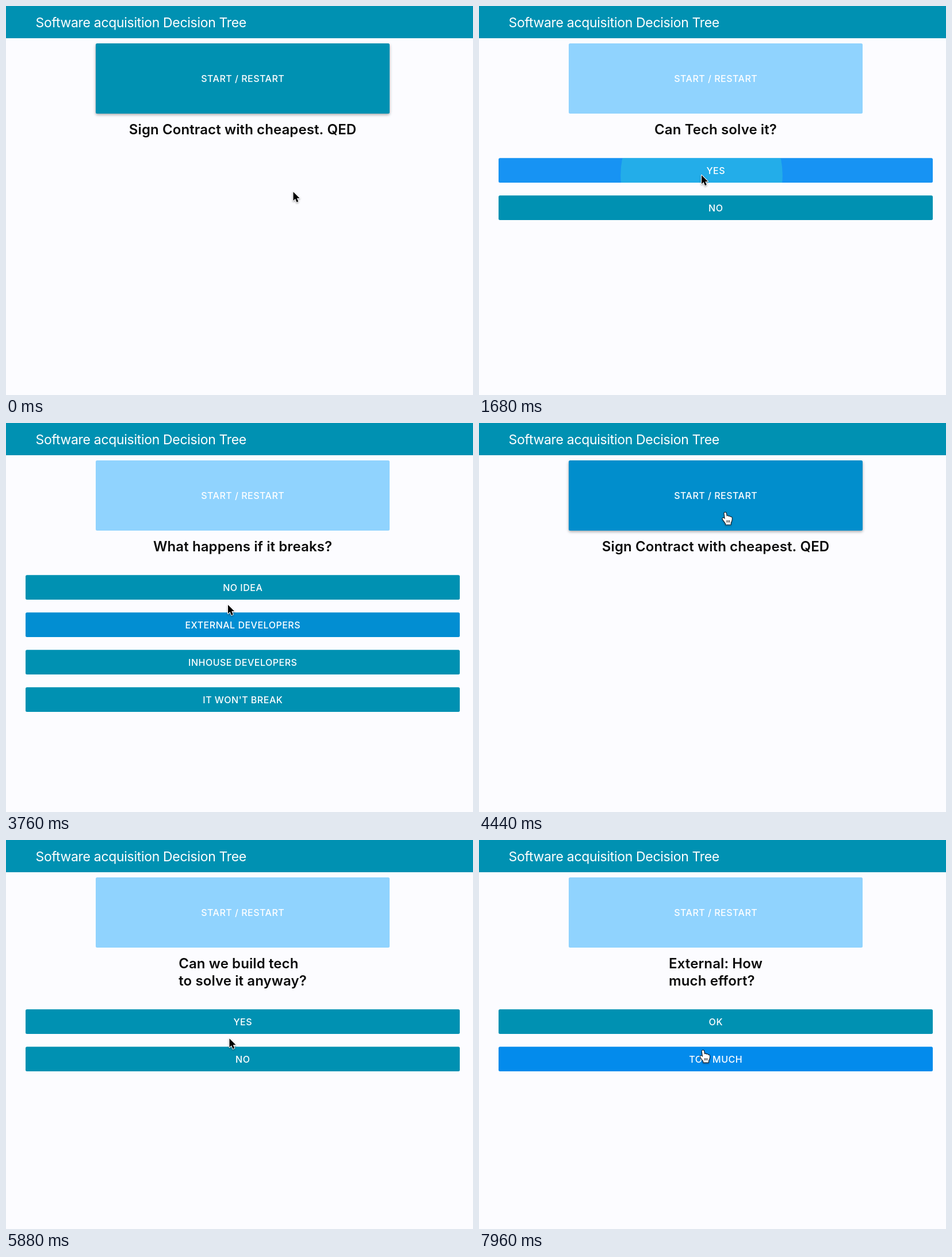
An HTML page with a canvas for the animation above (8000 ms loop, 812 by 676 pixels).

```html
<!DOCTYPE html>
<html lang="en">
<head>
<meta charset="utf-8">
<title>Decision Tree</title>
<style>
html, body { margin: 0; width: 100%; height: 100%; overflow: hidden; background: #fcfcff; }
canvas { display: block; }
</style>
</head>
<body>
<canvas id="stage" width="812" height="676"></canvas>
<script>
const ctx = document.getElementById('stage').getContext('2d');
const LOOP = 8000, STEP = 40, MID = 411.5;
const FONT = 'Inter, "Open Sans", sans-serif';
const TEAL = [0, 145, 178], HOVER = [3, 138, 242], DISABLED = [144, 211, 254];
const START = { x: 156, y: 65, w: 511, h: 122 };

const problem = { text: ['You have a problem or feature!'], options: ['OK'] };
const canSolve = { text: ['Can Tech solve it?'], options: ['YES', 'NO'] };
const available = { text: ['Is there tech available', 'that could solve', 'the problem?'], options: ['YES', 'NO'] };
const kind = { text: ['What kind of tech is it?'], options: ['NO IDEA', 'OPEN SOURCE', 'CLOSED SOURCE', 'INHOUSE', 'OTHER'] };
const breaks = { text: ['What happens if it breaks?'], options: ['NO IDEA', 'EXTERNAL DEVELOPERS', 'INHOUSE DEVELOPERS', "IT WON'T BREAK"] };
const build = { text: ['Can we build tech', 'to solve it anyway?'], options: ['YES', 'NO'] };
const developers = { text: ['Do you have developers?'], options: ['YES', 'NO'] };
const effort = { text: ['External: How', 'much effort?'], options: ['OK', 'TOO MUCH'] };
const signed = { text: ['Sign Contract with cheapest. QED'], options: [] };

// Each press: time, pressed button (-1 is START) and the screen it leads to.
const presses = [
  [600, -1, problem], [1480, 0, canSolve], [2000, 0, available],
  [2560, 0, kind], [3270, 1, breaks], [3960, 0, signed],
  [4600, -1, problem], [5110, 0, canSolve], [5400, 1, build],
  [6440, 0, developers], [7480, 1, effort]
].map(([time, button, next]) => ({ time, button, next }));
const RING_TIME = 120, SWITCH_DELAY = 140;

// Pointer path: time, x, y.
const path = [
  [0, 499.5, 323], [100, 499.5, 323], [480, 432, 150], [860, 432, 150],
  [1300, 387, 294], [1800, 387, 294], [1920, 388, 297], [2160, 388, 297],
  [2480, 394.5, 348], [2900, 394.5, 348], [3150, 388, 346], [3560, 388, 346],
  [3760, 386, 316], [3880, 388, 288], [4160, 388, 288], [4480, 430, 150],
  [4780, 430, 150], [5000, 418, 247], [5080, 405, 288], [5200, 405, 288],
  [5370, 388.5, 345], [5950, 388.5, 345], [6200, 389, 333], [7640, 389, 333],
  [7860, 389.5, 366], [8000, 389.5, 366]
];

const clamp = v => Math.max(0, Math.min(1, v));
const ease = v => v * v * (3 - 2 * v);
const mix = (a, b, k) => a.map((v, i) => v + (b[i] - v) * k);
const rgb = c => `rgb(${c.map(Math.round).join(',')})`;
const isEnd = screen => !screen.options.length;

function pointer(t) {
  const i = Math.max(1, path.findIndex(p => p[0] >= t));
  const [t0, x0, y0] = path[i - 1], [t1, x1, y1] = path[i];
  const k = ease(clamp((t - t0) / (t1 - t0)));
  return { x: x0 + (x1 - x0) * k, y: y0 + (y1 - y0) * k };
}

function screenAt(t) {
  let state = { screen: signed, last: signed, since: -1000 };
  for (const p of presses) {
    const since = p.time + SWITCH_DELAY;
    if (t >= since) state = { screen: p.next, last: state.screen, since };
  }
  return state;
}

function box(screen, i) {
  if (i < 0) return START;
  return { x: 34, y: 264.3 + 30 * (screen.text.length - 1) + 65 * i, w: 755, h: 42.8 };
}

function hovered(t) {
  const { screen } = screenAt(t), p = pointer(t);
  const hit = i => {
    const b = box(screen, i);
    return p.x >= b.x && p.x <= b.x + b.w && p.y >= b.y && p.y <= b.y + b.h;
  };
  if (isEnd(screen)) return hit(-1) ? -1 : null;
  const i = screen.options.findIndex((_, n) => hit(n));
  return i < 0 ? null : i;
}

// Share of the last 200 ms that the pointer spent on the button.
function hoverLevel(t, i) {
  let n = 0;
  for (let s = 0; s < 10; s++) if (hovered(Math.max(0, t - s * 20)) === i) n++;
  return n / 10;
}

function label(text, y) {
  ctx.font = `500 16px ${FONT}`;
  ctx.letterSpacing = '0.5px';
  ctx.textAlign = 'center';
  ctx.fillStyle = '#fff';
  ctx.fillText(text, MID + 0.25, y);
}

function ripple(b, spot, age) {
  const fade = clamp((440 - age) / 240);
  ctx.fillStyle = `rgba(255,255,255,${0.08 * fade * clamp(age / 100)})`;
  ctx.fillRect(b.x, b.y, b.w, b.h);
  ctx.fillStyle = `rgba(50,205,220,${0.45 * fade})`;
  ctx.beginPath();
  const y = Math.max(b.y, Math.min(b.y + b.h, spot.y));
  ctx.arc(spot.x, y, 400 * ease(clamp(age / 400)), 0, Math.PI * 2);
  ctx.fill();
}

function button(t, b, i, text, color, raised) {
  ctx.save();
  if (raised) {
    ctx.shadowColor = 'rgba(0,0,0,.35)';
    ctx.shadowBlur = 5;
    ctx.shadowOffsetY = 2;
  }
  ctx.fillStyle = rgb(color);
  ctx.beginPath();
  ctx.roundRect(b.x, b.y, b.w, b.h, 2.5);
  ctx.fill();
  ctx.shadowColor = 'transparent';
  ctx.clip();
  for (const p of presses) {
    const age = t - p.time - 40;
    if (p.button === i && age > 0 && age < 440) ripple(b, pointer(p.time), age);
  }
  ctx.restore();
  label(text, b.y + b.h / 2 + 6.2);
}

function heading(lines) {
  ctx.font = `600 24px ${FONT}`;
  ctx.letterSpacing = '0.1px';
  ctx.textAlign = 'left';
  ctx.fillStyle = '#0b0b0b';
  const width = Math.max(...lines.map(s => ctx.measureText(s).width));
  lines.forEach((s, i) => ctx.fillText(s, MID - width / 2, 222.5 + 30 * i));
}

const arrow = new Path2D('M0 0V15.2L3.5 12L6 17.9L8.8 16.7L6.3 11H11Z');
const hand = new Path2D('M-1.8 1C-1.8 -1 1.5 -1 1.7 1L2.6 6.2C4 4.8 5.5 5.4 5.8 6.8C7 5.8 8.5 6.3 8.8 7.7C10.2 7 11.4 7.8 11.5 9.3C11.8 14 10.4 15.2 9.5 18V20.5H0.7V18.5C-1 16.3 -2.5 14.2 -4.5 11.3C-5.5 9.5 -3.6 8.4 -2.2 9.6L-0.5 11Z');
const fingers = new Path2D('M2.8 13V17M5.1 13V17M7.4 13V17');

function drawRing(p) {
  ctx.beginPath();
  ctx.arc(p.x, p.y, 37, 0, Math.PI * 2);
  ctx.strokeStyle = 'rgba(255,255,255,.85)';
  ctx.lineWidth = 3.6;
  ctx.stroke();
  ctx.strokeStyle = '#000';
  ctx.lineWidth = 1.6;
  ctx.stroke();
}

function drawPointer(t, since) {
  const p = pointer(t);
  if (presses.some(q => t >= q.time && t < q.time + RING_TIME)) drawRing(p);
  const isHand = hovered(t) !== null && t >= since + 150;
  const shape = isHand ? hand : arrow;
  ctx.save();
  ctx.translate(p.x, p.y);
  ctx.lineJoin = 'round';
  ctx.shadowColor = 'rgba(0,0,0,.35)';
  ctx.shadowBlur = 3;
  ctx.shadowOffsetY = 1.5;
  ctx.strokeStyle = isHand ? '#000' : '#fff';
  ctx.lineWidth = isHand ? 1.8 : 2;
  ctx.stroke(shape);
  ctx.shadowColor = 'transparent';
  ctx.fillStyle = isHand ? '#fff' : '#000';
  ctx.fill(shape);
  if (isHand) {
    ctx.lineWidth = 0.9;
    ctx.stroke(fingers);
  }
  ctx.restore();
}

function draw(t) {
  const { screen, last, since } = screenAt(t);
  ctx.fillStyle = '#fcfcff';
  ctx.fillRect(0, 0, 812, 676);
  ctx.fillStyle = rgb(TEAL);
  ctx.fillRect(0, 0, 812, 56);
  ctx.font = `400 23px ${FONT}`;
  ctx.letterSpacing = '-0.31px';
  ctx.textAlign = 'left';
  ctx.fillStyle = '#fff';
  ctx.fillText('Software acquisition Decision Tree', 51.6, 36.5);

  const lit = mix(TEAL, HOVER, hoverLevel(t, -1));
  const startColor = s => isEnd(s) ? lit : DISABLED;
  const fade = clamp((t - since) / 200);
  button(t, START, -1, 'START / RESTART', mix(startColor(last), startColor(screen), fade), isEnd(screen));

  heading(screen.text);
  screen.options.forEach((text, i) => {
    button(t, box(screen, i), i, text, mix(TEAL, HOVER, hoverLevel(t, i)), false);
  });
  drawPointer(t, since);
}

const begin = performance.now();
function frame() {
  const t = (performance.now() - begin) % LOOP;
  draw(Math.floor(t / STEP) * STEP);
  requestAnimationFrame(frame);
}
frame();
</script>
</body>
</html>
```
